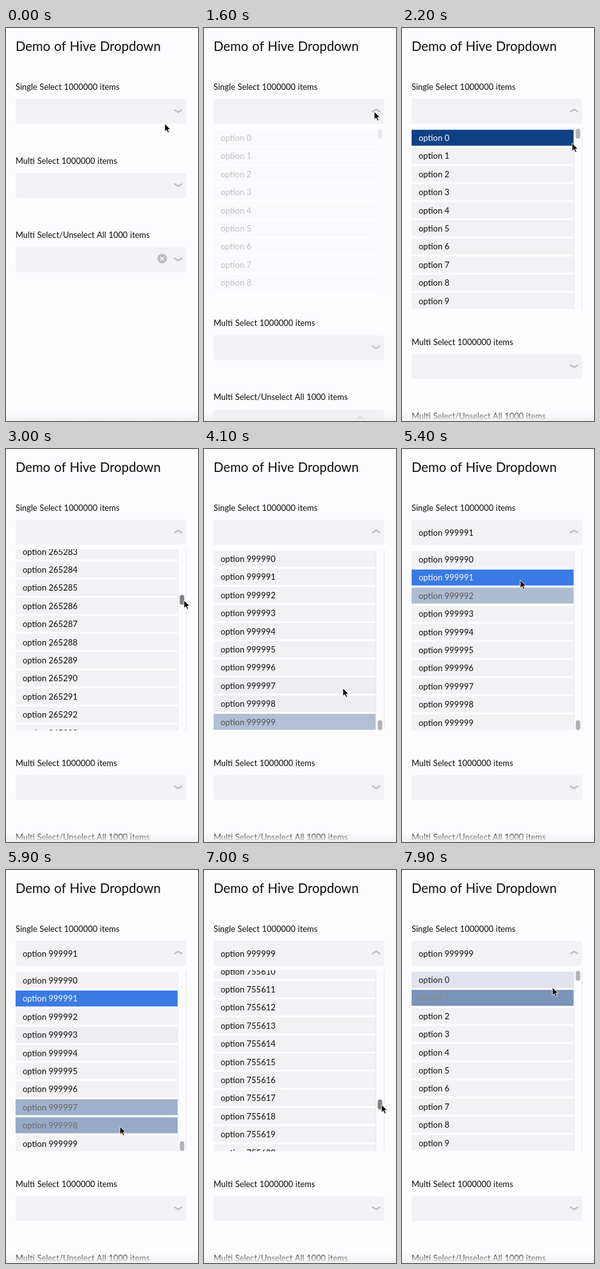
An HTML page for the animation above (8 s loop, 300 by 616 pixels).

```html
<!DOCTYPE html>
<html lang="en">
<head>
<meta charset="utf-8">
<title>Dropdown demo</title>
<style>
  html, body { margin: 0; width: 100%; height: 100%; overflow: hidden; background: #fdfcfe; }
  svg { display: block; width: 300px; height: 616px; }
  text { font: 13px Lato, "Open Sans", sans-serif; fill: #0c0c0c; white-space: pre; }
  .title { font-size: 20.3px; word-spacing: 1px; }
  .label { font-size: 12.9px; word-spacing: .4px; }
  .box { fill: #f2f1f4; }
  .chev { fill: none; stroke: #bebec1; stroke-width: 2.3; stroke-linecap: round; stroke-linejoin: round; }
</style>
</head>
<body>
<svg id="stage" viewBox="0 0 300 616">
  <defs>
    <linearGradient id="foot" x2="0" y2="1">
      <stop offset="0" stop-color="#f1f0f2" stop-opacity="0"/>
      <stop offset="1" stop-color="#f1f0f2"/>
    </linearGradient>
    <clipPath id="clip"><rect id="clipBox" x="15" y="157" width="270" height="0"/></clipPath>
  </defs>
  <rect width="300" height="616" fill="#fdfcfe"/>
  <text class="title" x="15" y="36">Demo of Hive Dropdown</text>
  <text class="label" x="15" y="97">Single Select 1000000 items</text>
  <rect class="box" x="15" y="111" width="266.5" height="39" rx="3"/>
  <text id="value" x="26" y="136"></text>
  <path id="chevron" class="chev"/>
  <g id="list" clip-path="url(#clip)">
    <g id="rows"></g>
    <rect x="268.5" y="157" width="13" height="284" fill="#fbfafc"/>
    <path d="M268.5 157V441M281.5 157V441" stroke="#e9e8eb"/>
    <rect id="thumb" x="271.5" width="7" height="15.5" rx="3.5"/>
  </g>
  <g id="below">
    <text class="label" x="15" y="213">Multi Select 1000000 items</text>
    <rect class="box" x="15" y="227.5" width="266.5" height="38.5" rx="3"/>
    <path class="chev" d="M263.5 244.5L269 248L274.500 244.5"/>
    <text class="label" x="15" y="329">Multi Select/Unselect All 1000 items</text>
    <rect class="box" x="15" y="344" width="266.5" height="38.5" rx="3"/>
    <circle cx="244" cy="361.500" r="7.3" fill="#bab9bc"/>
    <path d="M241.500 359l5 5m0-5l-5 5" stroke="#fff" stroke-width="1.5" stroke-linecap="round"/>
    <path class="chev" d="M263.5 361L269 364.500L274.5 361"/>
  </g>
  <rect y="600" width="300" height="16" fill="url(#foot)"/>
  <path id="cursor" d="M0 0V12.400L2.900 9.800L5 14.400L7.100 13.500L5.100 9H9Z"
        fill="#000" stroke="#fff" stroke-width=".9" stroke-linejoin="round"/>
</svg>
<script>
const LOOP = 8000, STEP = 100, PITCH = 28.4, ROW_H = 25, FIRST = 172;
const LAST = 999990, REST = LAST - 0.035, FADE = 200, OPEN_AT = 1150, OPEN_MS = 850;
const BASE = [242, 241, 244], HOVER = [14, 64, 132];

// time, x, y
const POINTER = [
  [0, 248, 150], [100, 271, 137], [700, 271, 137], [800, 268, 133], [900, 266, 131],
  [1700, 266, 131], [2000, 262, 176], [2150, 263, 184], [2400, 277, 166],
  [3000, 278, 237], [3100, 278, 237], [3800, 281, 433], [3900, 285, 458],
  [4000, 275, 437], [4040, 267, 432], [4090, 235, 416], [4100, 217, 375],
  [4300, 207, 300], [4500, 200, 232], [4770, 196, 240], [4780, 194, 276],
  [4900, 187, 291], [5000, 186, 288], [5300, 185, 206], [5730, 184, 204],
  [5740, 182, 362], [5800, 181, 378], [5820, 180, 388], [5900, 178, 402],
  [6100, 172, 428], [6300, 174, 428], [6700, 262, 431], [6800, 277, 433],
  [6900, 277, 433], [7300, 278, 172], [7400, 278, 172], [7500, 280, 150],
  [7600, 278, 140], [7770, 270, 196], [7780, 264, 198], [7875, 238, 188],
  [7885, 236, 184.4], [7900, 235, 184]
];
// time, index of the top row
const SCROLL = [
  [2400, 0], [3000, 265283.4], [3100, 265283.4], [3800, LAST], [4100, LAST],
  [4200, REST], [6900, REST], [7300, 22472], [7400, 22472], [7500, 0]
];
const PICKS = [[4550, 999992], [5350, 999991], [6250, 999999]];

const $ = id => document.getElementById(id);
const clamp = v => Math.max(0, Math.min(1, v));
const mix = (a, b, p) => a + (b - a) * p;
const rgb = c => `rgb(${c.map(Math.round)})`;

function sample(keys, t, i = 1) {
  const n = keys.findIndex(k => k[0] > t);
  if (n === 0) return keys[0][i];
  if (n < 0) return keys[keys.length - 1][i];
  const a = keys[n - 1], b = keys[n];
  return mix(a[i], b[i], (t - a[0]) / (b[0] - a[0]));
}

function add(tag, attrs) {
  const el = document.createElementNS("http://www.w3.org/2000/svg", tag);
  for (const k in attrs) el.setAttribute(k, attrs[k]);
  return $("rows").appendChild(el);
}

const rows = Array.from({ length: 11 }, () => ({
  bg: add("rect", { x: 15, width: 253, height: ROW_H }),
  label: add("text", { x: 26 })
}));

const center = (row, top) => FIRST + PITCH * (row - top);

// Share of the last FADE ms during which the pointer was over the row.
function hoverLevel(row, t) {
  let hits = 0;
  for (let d = 2; d < FADE; d += 4) {
    const u = t - d;
    if (u < OPEN_AT + 300 || sample(POINTER, u) > 268) continue;
    const dy = sample(POINTER, u, 2) - center(row, sample(SCROLL, u));
    if (Math.abs(dy) <= ROW_H / 2) hits++;
  }
  return hits * 4 / FADE;
}

function draw(t) {
  const p = clamp((t - OPEN_AT) / OPEN_MS);
  const slide = 284 * (1 - (1 - p) ** 3);
  const top = sample(SCROLL, t);
  const pick = PICKS.filter(k => k[0] <= t).pop()?.[1];

  $("clipBox").setAttribute("height", slide);
  $("list").setAttribute("opacity", p ** 2.2);
  $("below").setAttribute("transform", `translate(0 ${slide})`);
  $("chevron").setAttribute("d", p > 0 ? "M263.5 131L269 127.5L274.5 131" : "M263.5 128.5L269 132L274.5 128.5");
  $("value").textContent = pick ? `option ${pick}` : "";

  rows.forEach(({ bg, label }, i) => {
    const n = Math.floor(top) + i, y = center(n, top), picked = n === pick;
    const h = picked ? 0 : hoverLevel(n, t);
    bg.setAttribute("y", y - ROW_H / 2);
    bg.style.fill = picked ? "#3a7ae5" : rgb(BASE.map((c, j) => mix(c, HOVER[j], h)));
    label.setAttribute("y", y + 5);
    label.style.fill = picked ? "#fff" : rgb([12, 12, 12].map(c => mix(c, 255, h)));
    label.textContent = n < 1e6 ? `option ${n}` : "";
    bg.style.display = n < 1e6 ? "" : "none";
  });

  const dragging = (t >= 2400 && t < 4000) || (t >= 6800 && t < 7600);
  $("thumb").setAttribute("y", 158 + 267 * top / LAST);
  $("thumb").setAttribute("fill", dragging ? "#7f7e81" : "#b3b2b5");
  $("cursor").setAttribute("transform", `translate(${sample(POINTER, t)} ${sample(POINTER, t, 2)})`);
}

const start = performance.now();
function tick() {
  const t = (performance.now() - start) % LOOP;
  draw(Math.floor(t / STEP) * STEP);
  requestAnimationFrame(tick);
}
tick();
</script>
</body>
</html>
```
